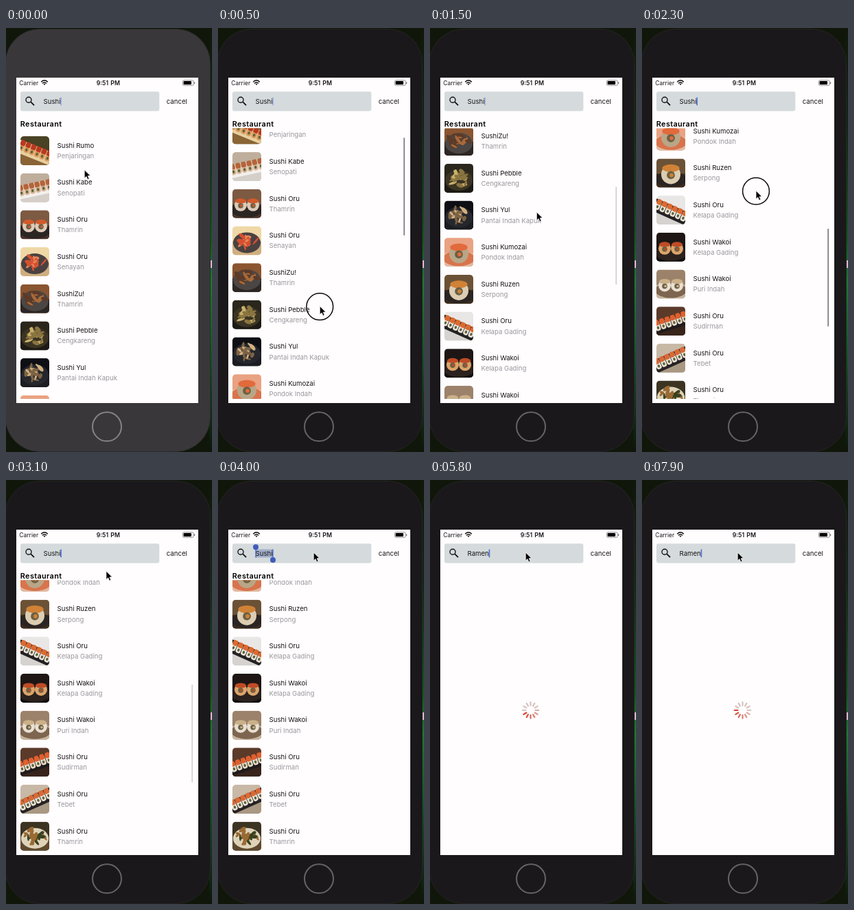
An HTML page that plays this animation: 300x615 px, repeating every 8000 ms.

```html
<!DOCTYPE html>
<html lang="en">
<head>
<meta charset="utf-8">
<title>Restaurant search</title>
<style>
  html, body { margin: 0; width: 100%; height: 100%; overflow: hidden; background: #10170a; }
  svg { display: block; width: 300px; height: 615px; }
  text { font: 9.6px Inter, Roboto, sans-serif; fill: #161517; white-space: pre; }
  .sub { fill: #99979b; }
  .head { font-size: 10.9px; font-weight: 600; letter-spacing: .34px; fill: #000; }
  .status { font-size: 8.5px; }
  .clock { font-size: 8.7px; font-weight: 600; word-spacing: 1px; }
</style>
</head>
<body>
<svg id="stage" viewBox="0 0 300 615">
  <defs>
    <linearGradient id="edge" x1="0" y1="0" x2="0" y2="1">
      <stop offset="0" stop-color="#10170a"/>
      <stop offset=".25" stop-color="#0f2a12"/>
      <stop offset=".5" stop-color="#14561f"/>
      <stop offset=".6" stop-color="#1c7a34"/>
      <stop offset=".75" stop-color="#155a26"/>
      <stop offset="1" stop-color="#0d150a"/>
    </linearGradient>
    <clipPath id="viewport"><rect x="15" y="145.5" width="265" height="392.5"/></clipPath>
    <clipPath id="thumb"><rect width="42" height="42" rx="5"/></clipPath>
  </defs>

  <rect width="300" height="615" fill="#10170a"/>
  <rect x="296" width="4" height="615" fill="url(#edge)"/>
  <rect x="298" y="337" width="2" height="11" fill="#dcb4cb"/>
  <rect id="body" x="-1" y="1.5" width="298.5" height="613" rx="50" stroke="#2a282a" stroke-width=".8"/>
  <circle id="home" cx="147" cy="578.3" r="21" fill="none" stroke-width="2"/>
  <rect x="15" y="72" width="265" height="472" fill="#fffdfe"/>

  <text class="status" x="19.3" y="82.6">Carrier</text>
  <g fill="none" stroke="#000" stroke-width="1.4">
    <path d="M51.2 78.3Q56 73.9 60.8 78.3M52.9 80.3Q56 77.5 59.1 80.3"/>
    <path d="M54.5 81.3Q56 80.2 57.5 81.3L56 83Z" fill="#000" stroke="none"/>
  </g>
  <text class="clock" x="131.8" y="82.6">9:51 PM</text>
  <rect x="257.4" y="75.9" width="15.8" height="7.4" rx="1.8" fill="none" stroke="#777" stroke-width=".8"/>
  <rect x="258.6" y="77.1" width="11.4" height="5" rx=".8"/>
  <rect x="274" y="78.2" width="1.2" height="2.8" rx=".6" fill="#777"/>

  <rect x="21" y="92.3" width="202.3" height="28.2" rx="3" fill="#d5dadc"/>
  <g fill="none" stroke="#111">
    <circle cx="33" cy="104.2" r="4" stroke-width="1.4"/>
    <path d="M36 107.2L41 112.1" stroke-width="1.8"/>
  </g>
  <rect id="mark" x="55" y="100.5" width="25" height="12" fill="#a3b0cc"/>
  <text id="query" x="54.6" y="109.8"></text>
  <rect id="caret" y="100.6" width="1.5" height="11.6" fill="#3f66d8"/>
  <g id="handles" fill="#3f5bb9">
    <path d="M54.4 97h1.2v15.5h-1.2zM79.4 100.5h1.2V116h-1.2z"/>
    <circle cx="55" cy="97.2" r="4"/><circle cx="80" cy="116" r="4"/>
  </g>
  <text x="233.8" y="109.8">cancel</text>

  <g id="results">
    <text class="head" x="20.8" y="142.6">Restaurant</text>
    <g clip-path="url(#viewport)"><g id="list"></g></g>
    <rect id="bar" x="270.2" width="1.9" height="142" rx=".95" fill="#87858a"/>
  </g>
  <g id="spinner" transform="translate(146.5 334)"></g>

  <circle id="press" r="19.4" fill="none" stroke="#0b0a0c" stroke-width="1.5"/>
  <path id="pointer" d="M0 0V12.2L2.8 9.6L4.7 13.9L6.9 12.9L5 8.8L8.7 8.5Z" fill="#000" stroke="#fff" stroke-width=".8"/>
</svg>
<script>
const $ = id => document.getElementById(id);
const LOOP = 8000, STEP = 100, PITCH = 53.68;

function add(parent, tag, attrs, text) {
  const el = document.createElementNS('http://www.w3.org/2000/svg', tag);
  for (const k in attrs) el.setAttribute(k, attrs[k]);
  if (text) el.textContent = text;
  return parent.appendChild(el);
}

function seeded(n) {
  return () => (n = (n * 16807) % 2147483647) / 2147483647;
}

const oval = (g, cx, cy, rx, ry, fill, turn = 0) =>
  add(g, 'ellipse', { cx, cy, rx, ry, fill, transform: `rotate(${turn} ${cx} ${cy})` });
const block = (g, x, y, width, height, fill, rx = 0) =>
  add(g, 'rect', { x, y, width, height, fill, rx });

// Slanted plate with a line of pieces
function platter(g, [plate, rice, top, turn]) {
  const r = add(g, 'g', { transform: `translate(21 22) rotate(${turn})` });
  block(r, -27, -8, 54, 19, plate, 2);
  for (let i = 0; i < 6; i++) {
    const x = -24 + i * 8.2;
    block(r, x, -7, 7.4, 14, rice, 3);
    block(r, x, -9, 7.4, 8, top, 2.5);
    oval(r, x + 3.7, 2.5, 1.7, 2.2, '#59643a');
  }
}

// Round plate heaped with small pieces
function dish(g, [plate, main, accent, seed]) {
  const rnd = seeded(seed * 7919);
  oval(g, 21, 24, 20, 15, plate);
  for (let i = 0; i < 24; i++) {
    const a = rnd() * 6.28, d = rnd() * 11;
    oval(g, 21 + d * 1.3 * Math.cos(a), 21 + d * Math.sin(a),
      3 + rnd() * 4, 1.3 + rnd() * 1.8, i % 3 ? main : accent, rnd() * 180);
  }
}

// A few large rolls seen from the front
function rolls(g, [plate, rice, top, count]) {
  oval(g, 21, 30, 23, 11, plate);
  for (let i = 0; i < count; i++) {
    const x = 21 + (i - (count - 1) / 2) * 18, r = count > 1 ? 9 : 14;
    oval(g, x, 23, r, r, rice);
    oval(g, x, 23 - r * .65, r * .9, r * .4, top);
    oval(g, x, 24, r * .42, r * .42, '#6b6044');
    oval(g, x + 1, 24, r * .2, r * .2, top);
  }
}

const rows = [
  ['Sushi Rumo', 'Penjaringan', ['#4a4224', '#8a6434'], platter, ['#e7cf9f', '#dd9a5e', '#b83a20', 22]],
  ['Sushi Kabe', 'Senopati', ['#bfae9c', '#d5cfc9'], platter, ['#f2efec', '#d9b596', '#b4653b', -12]],
  ['Sushi Oru', 'Thamrin', ['#7d5a42', '#4a342a'], rolls, ['#2b2523', '#dccbb8', '#d35a2b', 2]],
  ['Sushi Oru', 'Senayan', ['#efd8a6', '#cfae80'], dish, ['#4a4140', '#d65030', '#e88458', 4]],
  ['SushiZu!', 'Thamrin', ['#8a5530', '#2c2624'], dish, ['#4b4644', '#5e3a26', '#a86a3a', 5]],
  ['Sushi Pebble', 'Cengkareng', ['#2a261c', '#1d1a15'], dish, ['#3b3423', '#8a7440', '#c9b06c', 6]],
  ['Sushi Yul', 'Pantai Indah Kapuk', ['#0e0f14', '#1b1c22'], dish, ['#25272d', '#7c6244', '#d0b080', 7]],
  ['Sushi Kumozai', 'Pondok Indah', ['#e9a283', '#e2b9a0'], rolls, ['#d8744d', '#b9a687', '#e26a3c', 1]],
  ['Sushi Ruzen', 'Serpong', ['#6b5236', '#3c2c1e'], rolls, ['#2a2422', '#dccdb2', '#d08236', 1]],
  ['Sushi Oru', 'Kelapa Gading', ['#e9e7e5', '#d5d2d0'], platter, ['#232122', '#eee5dc', '#dd6a30', 24]],
  ['Sushi Wakoi', 'Kelapa Gading', ['#1d1614', '#120f10'], rolls, ['#2b211d', '#dba46a', '#bf4c26', 2]],
  ['Sushi Wakoi', 'Puri Indah', ['#9c826a', '#c7b49c'], rolls, ['#7d654f', '#e9e0d2', '#cbb08a', 2]],
  ['Sushi Oru', 'Sudirman', ['#5b3a2a', '#38241b'], platter, ['#1f1b1c', '#eadccb', '#e0602e', -18]],
  ['Sushi Oru', 'Tebet', ['#c8b8a6', '#a99883'], platter, ['#272324', '#efe4d8', '#d96a36', -24]],
  ['Sushi Oru', 'Thamrin', ['#3c3322', '#5f4a2e'], dish, ['#ded3b9', '#9a6a34', '#39411f', 15]],
];

rows.forEach(([name, place, [upper, lower], draw, look], i) => {
  const y = 157 + i * PITCH;
  const pic = add(add($('list'), 'g', { transform: `translate(21 ${y})` }), 'g', { 'clip-path': 'url(#thumb)' });
  block(pic, 0, 0, 42, 42, upper);
  block(pic, 0, 22, 42, 20, lower);
  draw(pic, look);
  add($('list'), 'text', { x: 74.6, y: y + 16.8 }, name);
  add($('list'), 'text', { x: 74.6, y: y + 32, class: 'sub' }, place);
});

const petals = Array.from({ length: 12 }, (_, i) =>
  add($('spinner'), 'rect', { x: -1.1, y: -12.8, width: 2.2, height: 6.8, rx: 1.1, transform: `rotate(${i * 30})` }));

// Tables of [time, values...], straight lines between the rows
const pointerPath = [
  [0, 114.2, 205.8], [100, 119, 245], [300, 146, 425], [400, 147, 434], [800, 152, 312],
  [1000, 154, 272], [1100, 155.3, 267], [1500, 155.3, 267], [1800, 164, 404], [1900, 164, 404],
  [2300, 166, 236], [2500, 166, 214], [2800, 166, 214], [3200, 139.2, 105],
];
const scrollPath = [
  [0, 0], [400, 0], [800, 122.3], [1000, 168], [1100, 195], [1200, 214], [1300, 224], [1400, 228.5],
  [1900, 228.5], [2300, 397], [2500, 419], [2700, 415], [2900, 412.8],
];
const barFade = [[400, 0], [500, 1], [1300, 1], [1600, 0], [1900, 0], [2000, 1], [2900, 1], [3200, 0]];

function at(path, t) {
  const i = path.findIndex(p => p[0] > t);
  if (i === 0) return path[0].slice(1);
  if (i < 0) return path[path.length - 1].slice(1);
  const a = path[i - 1], b = path[i], k = (t - a[0]) / (b[0] - a[0]);
  return a.slice(1).map((v, j) => v + (b[j + 1] - v) * k);
}

function mix(a, b, k) {
  return `rgb(${a.map((v, i) => Math.round(v + (b[i] - v) * k))})`;
}

const within = (t, from, to) => t >= from && t < to;
const show = (id, on) => $(id).setAttribute('visibility', on ? 'visible' : 'hidden');

function caretAlpha(t) {
  if (t < 200) return .5;
  if (within(t, 4400, 5300)) return 1;
  const off = Math.abs(t % 1000 - 500);
  return Math.min(1, .45 + Math.max(0, off - 50) / 150);
}

function render(t) {
  const active = t >= 400;
  $('body').setAttribute('fill', active ? '#1a181b' : '#39373a');
  $('home').setAttribute('stroke', active ? '#656365' : '#858285');

  const [scroll] = at(scrollPath, t);
  $('list').setAttribute('transform', `translate(0 ${-scroll})`);
  $('bar').setAttribute('y', 148 + .36 * scroll);
  $('bar').setAttribute('opacity', at(barFade, t)[0]);

  const typed = Math.floor((t - 4400) / 150) + 1;
  $('query').textContent = t < 4400 ? 'Sushi' : 'Ramen'.slice(0, typed);
  const selected = within(t, 3500, 4400);
  show('mark', selected);
  show('handles', selected);
  show('caret', !selected);
  $('caret').setAttribute('x', 54.5 + $('query').getComputedTextLength());
  $('caret').setAttribute('opacity', caretAlpha(t));

  const loading = t >= 4600;
  show('results', !loading);
  show('spinner', loading);
  const lead = Math.floor(t * 12 / 1000) - 1;
  petals.forEach((p, i) => {
    const age = (((lead - i) % 12) + 12) % 12;
    p.setAttribute('fill', mix([219, 62, 44], [216, 194, 189], Math.min(1, age / 6)));
  });

  const [x, y] = at(pointerPath, t);
  $('pointer').setAttribute('transform', `translate(${x} ${y})`);
  $('press').setAttribute('transform', `translate(${x} ${y + .7})`);
  show('press', within(t, 400, 1000) || within(t, 1900, 2500));
}

const start = performance.now();
function tick() {
  const t = (performance.now() - start) % LOOP;
  render(Math.floor(t / STEP) * STEP);
  requestAnimationFrame(tick);
}
tick();
</script>
</body>
</html>
```
